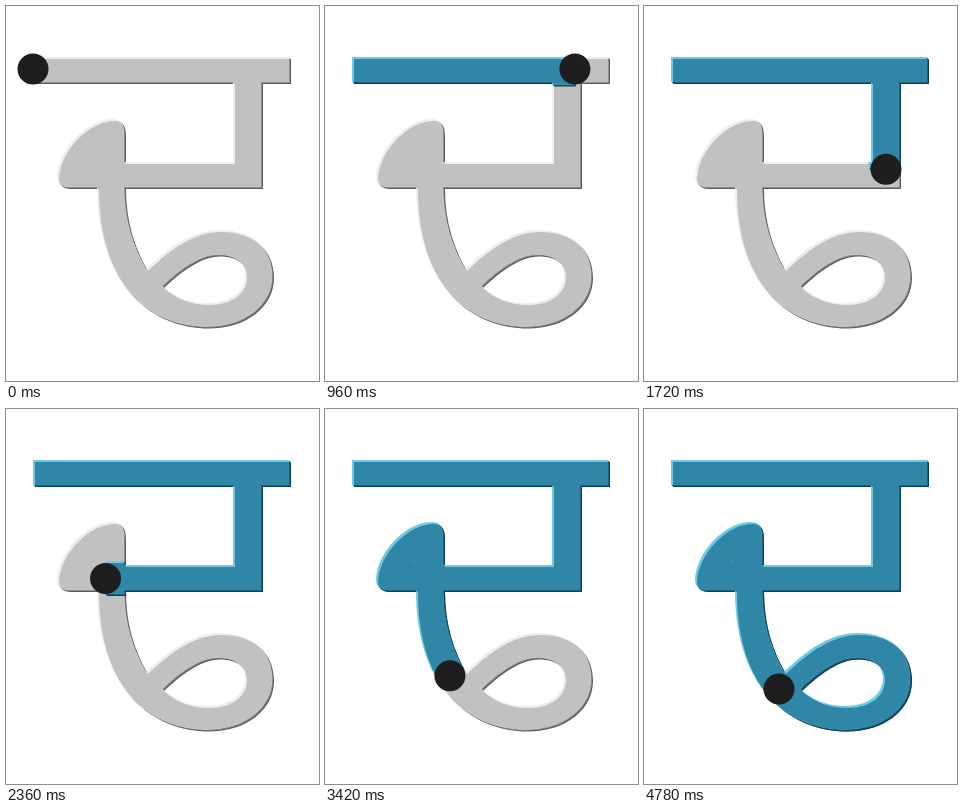
Recreate the animation shown at these times as an HTML page. Size 313x375 px, loop 4.8 s.

```html
<!DOCTYPE html>
<html>
<head>
<meta charset="utf-8">
<style>
  html, body { margin: 0; width: 100%; height: 100%; overflow: hidden; background: #fff; }
  svg { display: block; }
</style>
</head>
<body>
<svg width="313" height="375" viewBox="0 0 313 375">
  <defs id="defs">
    <path id="glyph" fill-rule="evenodd" d="M28 52H284V77H256V182H119C119 215 128 242 141 264
      C165 241 188 225 214 225C247 225 267 243 267 271C267 300 239 321.5 202 321.5
      C150 321.5 92 285 92 182H64C56 182 52 178 52 171C54 143 82 114 108 114
      C116 114 119 119 119 130V157H228V77H28Z
      M157 281C174 265 194 249.5 213 249.5C231 249.5 240 258 240 270C240 287 224 298 203 298
      C184 298 169 292 157 281Z"/>
    <mask id="written" maskUnits="userSpaceOnUse" x="0" y="0" width="313" height="375">
      <path id="pen" fill="none" stroke="#fff" stroke-width="33" d="M27 63H284H242V169.5H64.5
        C65 148 82 129 105 124.5V182C105 215 112 246 125 267C142 295 170 310 202 310
        C236 310 255 290 254 262C252 247 234 238 212 238C182 238 158 256 135 280"/>
    </mask>
  </defs>
  <use href="#glyph" fill="#c1c1c1" filter="url(#grayBevel)"/>
  <g filter="url(#blueBevel)">
    <use href="#glyph" fill="#2f86a6" mask="url(#written)"/>
  </g>
  <circle id="dot" r="15.5" fill="#1e1e1e"/>
</svg>
<script>
  const LOOP = 4800, STEP = 20;
  const byId = id => document.getElementById(id);

  // Lit from the upper left: shade and light are shifted copies under a trimmed face.
  function bevel(id, dark, mid, light) {
    const tint = (color, shape) => `<feFlood flood-color="${color}"/>
      <feComposite operator="in" in2="${shape}" result="${shape}Tint"/>`;
    return `<filter id="${id}" filterUnits="userSpaceOnUse" x="0" y="0" width="313" height="375"
        color-interpolation-filters="sRGB">
      <feOffset in="SourceAlpha" dx="1" dy="1" result="low"/>
      <feOffset in="SourceAlpha" dx="-1" dy="-1" result="high"/>
      <feOffset in="SourceAlpha" dx="0" dy="0" result="base"/>
      ${tint(dark, 'low')}${tint(mid, 'base')}${tint(light, 'high')}
      <feComposite in="SourceGraphic" in2="low" operator="in"/>
      <feComposite in2="high" operator="in" result="face"/>
      <feMerge>
        <feMergeNode in="lowTint"/><feMergeNode in="baseTint"/>
        <feMergeNode in="highTint"/><feMergeNode in="face"/>
      </feMerge>
    </filter>`;
  }
  byId('defs').insertAdjacentHTML('beforeend',
    bevel('grayBevel', '#5c5c5c', '#8e8e8e', '#eeeeee') +
    bevel('blueBevel', '#0b3f58', '#1c6482', '#6ccbe0'));

  const pen = byId('pen'), dot = byId('dot');
  const length = pen.getTotalLength();
  const start = performance.now();

  function draw(now) {
    const elapsed = Math.max(0, now - start) % LOOP;
    const time = Math.floor(elapsed / STEP) * STEP;
    const travelled = length * time / (LOOP - STEP);
    const { x, y } = pen.getPointAtLength(travelled);
    pen.setAttribute('stroke-dasharray', `${travelled} 9999`);
    dot.setAttribute('cx', x);
    dot.setAttribute('cy', y);
    requestAnimationFrame(draw);
  }
  draw(start);
</script>
</body>
</html>
```
